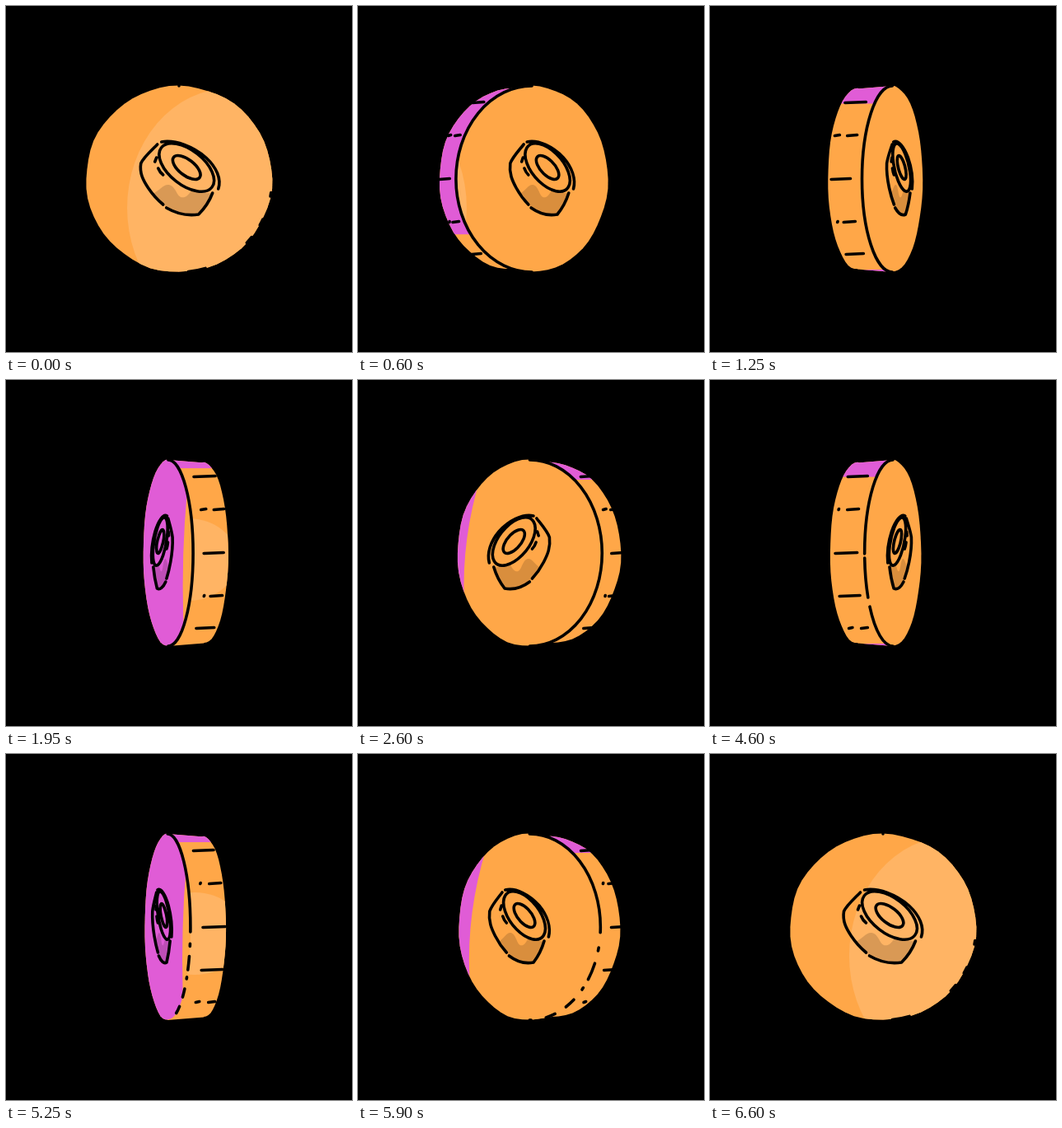
An HTML page with a canvas that plays this animation: 420 by 420 pixels, repeating every 6.65 s.

```html
<!DOCTYPE html>
<html>
<head>
<meta charset="utf-8">
<style>
html, body { margin: 0; height: 100%; overflow: hidden; background: #000; }
canvas { display: block; }
</style>
</head>
<body>
<canvas id="stage" width="420" height="420"></canvas>
<script>
const ctx = document.getElementById('stage').getContext('2d');
const LOOP = 6650, STEP = 50, R = 113, MID = 210;
const FAR = .97; // the far face is a little smaller
const ORANGE = '#ffa748', LIGHT = '#ffb464', PINK = '#e05cd6';
const rad = d => d * Math.PI / 180;

// Roll of tape, drawn for the front face
const rollLines = new Path2D(`
  M183 168C174 177 166 184 163 191C161 203 166 212 172 221C178 230 184 236 190 241
  M194 245C206 252 220 255 233 253C241 245 247 235 250 227
  M188 165C205 162 227 171 242 184C255 196 261 210 257 222
  M180 189L182 184M184 197Q186 202 190 205`);
for (const [a, b] of [[39, 21], [20, 9.5]]) {
  const ring = new Path2D();
  ring.ellipse(218.5, 196, a, b, rad(38), 0, 7);
  rollLines.addPath(ring);
}
const rollShade = new Path2D(`
  M177 228C186 224 190 216 197 217C207 219 206 235 216 232C223 229 223 222 229 223
  C238 226 244 228 250 227C247 236 241 246 233 253C214 255 190 247 177 228Z`);

const ROWS = [
  [117, [[.14, .74]], [[.18, .74]]],
  [157, [[.12, .26], [.48, .76]], [[.17, .18], [.42, .74]]],
  [210, [[.12, .67]], [[.17, .79]]],
  [262, [[.2, .21], [.38, .71]], [[.2, .78]]],
  [301, [[.19, .69]], [[.23, .33], [.58, .76]]]
];
const DASH_GAPS = [120, 5, 46, 11, 400];
const DASH_BROKEN = [125, 14, 3, 12, 16, 9, 2, 12, 10, 12, 9, 14, 8, 99];
const DASH_FLAT = [0, 130, 3, 20, 5, 12, 6, 40, 14, 20, 5, 99];

function blob(cx, hw, hh) {
  const p = new Path2D();
  for (let i = 0; i < 60; i++) {
    const a = i * Math.PI / 30;
    const k = 1 + .004 * Math.sin(7 * a + 1) + .003 * Math.sin(11 * a);
    p.lineTo(cx + hw * k * Math.cos(a), MID + hh * k * Math.sin(a));
  }
  p.closePath();
  return p;
}

// Far face plus the band that joins it to the near face
function hull(faceX, backX, hw) {
  const p = blob(backX, hw * FAR, R * FAR);
  const ends = [[faceX, R], [backX, R * FAR]].sort((a, b) => a[0] - b[0]);
  const [[x1, h1], [x2, h2]] = ends;
  p.moveTo(x1, MID - h1);
  p.lineTo(x2, MID - h2);
  p.lineTo(x2, MID + h2);
  p.lineTo(x1, MID + h1);
  p.closePath();
  return p;
}

function oval(x, y, rx, ry, color) {
  ctx.fillStyle = color;
  ctx.beginPath();
  ctx.ellipse(x, y, rx, ry, 0, 0, 7);
  ctx.fill();
}

function clipped(path, paint) {
  ctx.save();
  ctx.clip(path);
  paint();
  ctx.restore();
}

function drawRim(body, psi) {
  clipped(body, () => {
    ctx.fillStyle = ORANGE;
    ctx.fillRect(0, 0, 420, 420);
    oval(240 - 6 * (psi - 14), 218, 60, 50, LIGHT);
    const top = 107 + 11 * ((psi - 14) / 34) ** 2 + 4 * Math.max(0, -25 - psi);
    ctx.fillStyle = PINK;
    ctx.fillRect(0, 0, 420, top);
    if (psi < 0) ctx.fillRect(0, 320, 420, 99);
  });
}

function drawFace(face, cx, hw, phi) {
  clipped(face, () => {
    ctx.fillStyle = ORANGE;
    ctx.fillRect(0, 0, 420, 420);
    oval(284 - 8.1 * phi, 245, 124, 145, LIGHT);
    if (phi < -30) {
      const x = u => cx + hw * (-1 + 2 * (-phi - 35) / 47 + u);
      ctx.fillStyle = PINK;
      ctx.beginPath();
      ctx.moveTo(0, 91);
      ctx.lineTo(x(.31), 91);
      ctx.quadraticCurveTo(x(-.19), MID, x(.06), 329);
      ctx.lineTo(0, 329);
      ctx.fill();
    }
  });
}

function drawRoll(cx, phi, c, front) {
  const x = cx + 13 * Math.sin(rad(2 * phi));
  const m = new DOMMatrix([front ? c : -c, 0, 0, 1, x + (front ? -c : c) * MID, 0]);
  const place = p => { const q = new Path2D(); q.addPath(p, m); return q; };
  ctx.fillStyle = 'rgba(0,0,0,.15)';
  ctx.fill(place(rollShade));
  ctx.stroke(place(rollLines));
}

function drawTicks(faceX, backX, hw, side, second, shift) {
  for (const [y, a, b] of ROWS) {
    const w = side * hw * Math.sqrt(1 - ((y - MID) / R) ** 2);
    const left = Math.min(faceX, backX) + w, width = Math.abs(faceX - backX);
    ctx.beginPath();
    for (const [from, to] of second ? b : a) {
      ctx.moveTo(left + width * (from + shift), y + .5);
      ctx.lineTo(left + width * (to + shift), y - .5);
    }
    ctx.stroke();
  }
}

function drawCoin(t) {
  const theta = t / LOOP * 360 + 1.6;
  const turn = (theta + 90) % 360;
  const front = turn < 180;
  const phi = turn % 180 - 90;
  const c = Math.cos(rad(phi)) ** 1.08, s = Math.abs(Math.sin(rad(phi)));
  const dir = phi < 0 ? -1 : 1;
  const hw = R * c;
  const thick = 46 * s ** 1.2;
  const faceX = MID + dir * 23 * (1 - c) ** 1.8;
  const backX = faceX - dir * thick;

  drawRim(hull(faceX, backX, hw), phi - dir * 90);
  drawFace(blob(faceX, hw, R), faceX, hw, phi);

  ctx.strokeStyle = '#000';
  ctx.lineWidth = 3.6;
  ctx.lineCap = ctx.lineJoin = 'round';
  const second = theta > 180;
  const shift = dir < 0 ? .1 + .3 * c : 0;
  if (thick > 12) drawTicks(faceX, backX, hw, -dir, second, shift);

  // Edge between face and rim
  const right = phi < 2;
  const scale = (228 + 130 * c ** 1.5) / 240;
  const dash = Math.abs(phi) < 8 ? DASH_FLAT
    : theta > 270 ? DASH_BROKEN : second ? DASH_GAPS : [];
  ctx.setLineDash(dash.map(d => d * scale));
  ctx.beginPath();
  ctx.ellipse(faceX, MID, hw, R, 0, -Math.PI / 2, Math.PI / 2, !right);
  ctx.stroke();
  ctx.setLineDash([]);

  drawRoll(faceX, phi, c, front);
}

const start = performance.now();
function frame() {
  const t = Math.max(0, performance.now() - start) % LOOP;
  ctx.fillStyle = '#000';
  ctx.fillRect(0, 0, 420, 420);
  drawCoin(Math.floor(t / STEP) * STEP);
  requestAnimationFrame(frame);
}
frame();
</script>
</body>
</html>
```
